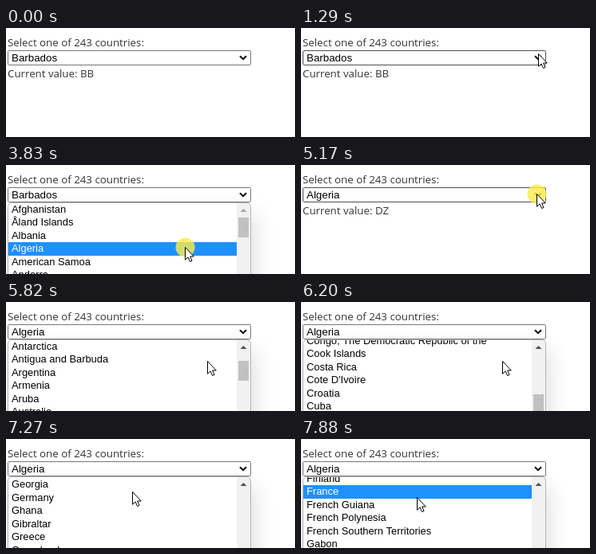
These frames come from a looping animation (362 by 137 pixels, 8 s). An HTML page with a canvas:

```html
<!DOCTYPE html>
<html lang="en">
<head>
<meta charset="utf-8">
<title>Country select</title>
<style>
  html, body { margin: 0; width: 100%; height: 100%; overflow: hidden; background: #fff; }
  canvas { display: block; }
</style>
</head>
<body>
<canvas width="362" height="137"></canvas>
<script>
const ctx = document.querySelector('canvas').getContext('2d');
const LOOP = 8000, LIST_TOP = 48, ROW = 16.5;
const LABEL_FONT = '13.3px "Open Sans", sans-serif';
const SELECT_FONT = '13.33px "Liberation Sans", Arial, sans-serif';
const OPTION_FONT = '12.9px "Liberation Sans", Arial, sans-serif';

const countries = `Afghanistan|Åland Islands|Albania|Algeria|American Samoa|Andorra|Angola|Anguilla|Antarctica|Antigua and Barbuda|Argentina|Armenia|Aruba|Australia|Austria|Azerbaijan|Bahamas|Bahrain|Bangladesh|Barbados|Belarus|Belgium|Belize|Benin|Bermuda|Bhutan|Bolivia|Bosnia and Herzegovina|Botswana|Bouvet Island|Brazil|British Indian Ocean Territory|Brunei Darussalam|Bulgaria|Burkina Faso|Burundi|Cambodia|Cameroon|Canada|Cape Verde|Cayman Islands|Central African Republic|Chad|Chile|China|Christmas Island|Cocos (Keeling) Islands|Colombia|Comoros|Congo|Congo, The Democratic Republic of the|Cook Islands|Costa Rica|Cote D'Ivoire|Croatia|Cuba|Cyprus|Czech Republic|Denmark|Djibouti|Dominica|Dominican Republic|Ecuador|Egypt|El Salvador|Equatorial Guinea|Eritrea|Estonia|Ethiopia|Falkland Islands (Malvinas)|Faroe Islands|Fiji|Finland|France|French Guiana|French Polynesia|French Southern Territories|Gabon|Gambia|Georgia|Germany|Ghana|Gibraltar|Greece|Greenland|Grenada|Guadeloupe|Guam|Guatemala|Guernsey|Guinea|Guinea-Bissau|Guyana|Haiti`.split('|');

// Each move: time of first step, time of last step, step count, destination
const pointerMoves = [
  [676, 1130, 7, 296, 33], [1290, 1290, 1, 297, 32],
  [1890, 2340, 7, 231, 88], [2430, 2530, 2, 223, 101], [2670, 2670, 1, 224, 103],
  [4330, 4650, 5, 295, 36], [5330, 5480, 3, 252, 74],
  [6420, 6590, 3, 159, 66], [6660, 6660, 1, 158, 66], [7720, 7880, 3, 145, 73]
];
const scrollMoves = [[5710, 5820, 2, 132], [5900, 6500, 9, 1392], [6890, 7660, 11, 1194]];

function follow(moves, start, t) {
  let pos = start;
  for (const [from, to, steps, ...goal] of moves) {
    if (t < from) break;
    const done = t >= to ? 1 : (Math.floor((t - from) / (to - from) * (steps - 1) + 1e-6) + 1) / steps;
    pos = pos.map((v, i) => v + (goal[i] - v) * done);
  }
  return pos;
}

const within = (t, a, b) => t >= a && t < b;

function hotIndex(t, y, scroll) {
  if (t < 1890) return 19;
  if (within(t, 5250, 5400)) return 3;
  if (within(t, 5710, 6590)) return 1;
  if (within(t, 6890, 7720)) return 85;
  return y < LIST_TOP ? -1 : Math.floor((y - LIST_TOP + scroll) / ROW);
}

function rect(color, x, y, w, h) {
  ctx.fillStyle = color;
  ctx.fillRect(x, y, w, h);
}

function text(str, x, y, font, color) {
  ctx.font = font;
  ctx.fillStyle = color;
  ctx.fillText(str, x, y);
}

function drawSelect(value, hovered) {
  ctx.strokeStyle = hovered ? '#4f4f4f' : '#767676';
  ctx.lineWidth = 1;
  ctx.beginPath();
  ctx.roundRect(2.5, 28.5, 304, 18, 1);
  ctx.stroke();
  text(value, 7, 42, SELECT_FONT, '#000');
  ctx.strokeStyle = '#000';
  ctx.lineWidth = 2;
  ctx.stroke(new Path2D('M293 35.2L297 39.2L301 35.2'));
}

function drawList(scroll, hot) {
  ctx.save();
  ctx.shadowColor = 'rgba(0,0,0,.15)';
  ctx.shadowBlur = 28;
  ctx.shadowOffsetX = 3;
  ctx.shadowOffsetY = 14;
  ctx.fillStyle = '#fff';
  ctx.beginPath();
  ctx.roundRect(2, 47, 305, 340, 5);
  ctx.fill();
  ctx.restore();

  ctx.save();
  ctx.beginPath();
  ctx.roundRect(3, LIST_TOP, 303, 100, 4);
  ctx.clip();
  const first = Math.floor(scroll / ROW);
  for (let i = first; i < first + 7; i++) {
    const top = Math.floor(LIST_TOP + i * ROW - scroll);
    if (i === hot) rect('#1e90ff', 3, top, 286, 17);
    text(countries[i], 7, top + 12, OPTION_FONT, i === hot ? '#fff' : '#000');
  }
  rect('#f1f1f1', 289, LIST_TOP, 17, 100);
  rect('#c1c1c1', 291, Math.round(66 + scroll * 0.0606), 13, 25);
  ctx.fillStyle = scroll ? '#505050' : '#a3a3a3';
  ctx.fill(new Path2D('M293.5 59H301.5L297.5 55Z'));
  ctx.restore();

  ctx.strokeStyle = '#b4b4b4';
  ctx.lineWidth = 1;
  ctx.beginPath();
  ctx.roundRect(2.5, 47.5, 304, 340, 5);
  ctx.stroke();
}

function drawPointer(x, y, pressed) {
  ctx.save();
  ctx.translate(Math.round(x), Math.round(y));
  if (pressed) {
    ctx.fillStyle = 'rgba(250,236,75,.82)';
    ctx.beginPath();
    ctx.arc(0.5, 0.5, 12, 0, 7);
    ctx.fill();
  }
  const arrow = new Path2D('M.5.5V16.3L4.1 12.9L6.5 18.5L9 17.5L6.6 12H11.3Z');
  ctx.fillStyle = '#fff';
  ctx.fill(arrow);
  ctx.strokeStyle = '#000';
  ctx.lineWidth = 1;
  ctx.stroke(arrow);
  ctx.restore();
}

function draw(t) {
  const [x, y] = follow(pointerMoves, [224, 101], t);
  const [scroll] = follow(scrollMoves, [0], t);
  const chosen = t >= 3920;
  const open = within(t, 1550, 3920) || t >= 5250;
  const pressed = within(t, 1440, 1550) || within(t, 3830, 3920) || within(t, 5170, 5250);

  rect('#fff', 0, 0, 362, 137);
  text('Select one of 243 countries:', 2, 23, LABEL_FONT, '#333');
  text('Current value: ' + (chosen ? 'DZ' : 'BB'), 2, 62, LABEL_FONT, '#333');
  if (open) drawList(scroll, hotIndex(t, y, scroll));
  drawSelect(chosen ? 'Algeria' : 'Barbados', t >= 600 && y >= 28 && y < 47);
  if (t >= 600) drawPointer(x, y, pressed);
}

const began = performance.now();
function tick() {
  draw((performance.now() - began) % LOOP);
  requestAnimationFrame(tick);
}
tick();
</script>
</body>
</html>
```
